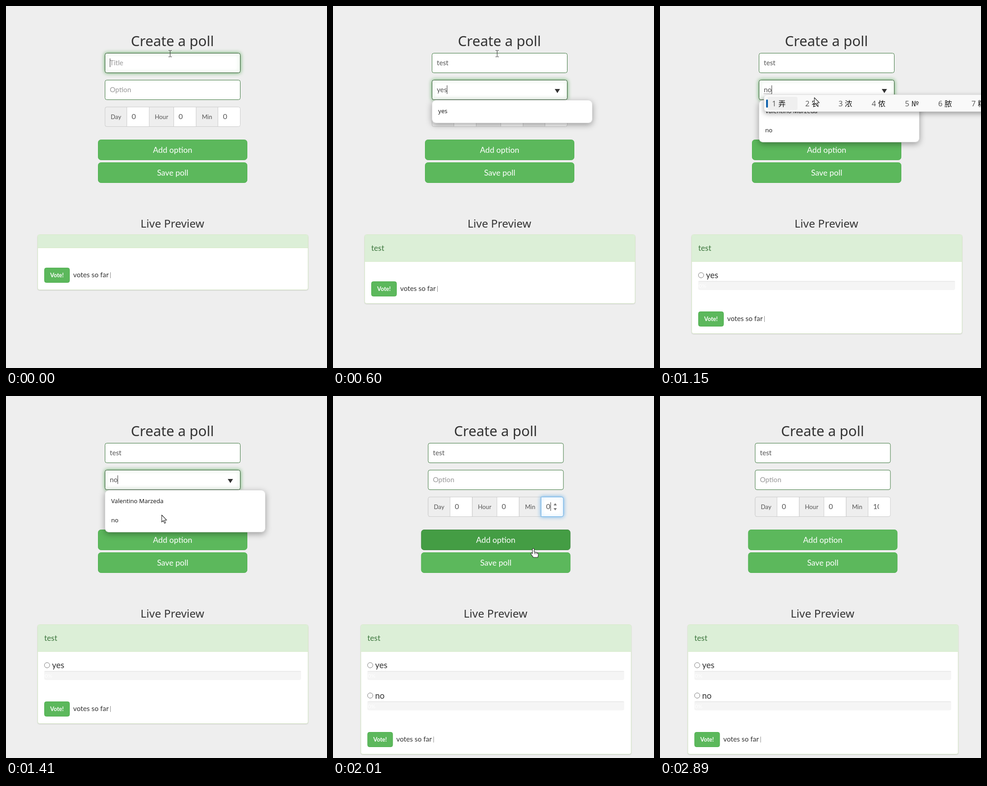
An HTML page with a canvas that plays this animation: 705 by 794 pixels, repeating every 2960 ms.

```html
<!DOCTYPE html>
<html lang="en">
<head>
<meta charset="utf-8">
<title>Create a poll</title>
<style>
html, body { margin: 0; width: 100%; height: 100%; overflow: hidden; background: #eee; }
canvas { display: block; width: 705px; height: 794px; }
</style>
</head>
<body>
<canvas id="stage" width="705" height="794"></canvas>
<script>
const ctx = document.getElementById('stage').getContext('2d');
const LOOP = 2960, STEPS = 44;
const BODY = 'Lato, "Noto Sans", sans-serif';
const HEAD = '"Noto Sans", "Open Sans", sans-serif';
const UI = '"Open Sans", "Noto Sans", sans-serif';
const CJK = '"Noto Sans CJK SC", "Noto Sans CJK", "Noto Sans", sans-serif';

// Pointer path: step, x, y
const PATH = [
  [0, 360, 104], [9, 360, 104], [13, 278, 307], [14, 278, 307],
  [16, 339, 201], [19, 339, 201], [23, 345, 321], [26, 345, 321],
  [28, 470, 243], [30, 440, 335], [34, 440, 335], [36, 430, 362], [40, 430, 362]
];
const HAND = new Path2D('M-2 1.5a2 2 0 0 1 4 0V7l6 1.5q3.5 1 3 5l-1.2 5.5H0l-5-7q-1-2 .5-2.6t2.5 1.6z');
const ARROW = new Path2D('M0 0V15.5l3.6-3.3 2.6 6 2.4-1.1-2.5-5.8H11z');

const within = (k, a, b) => k >= a && k <= b;

function text(str, x, y, size, color, font = BODY, align = 'left', weight = 400) {
  ctx.font = `${weight} ${size}px ${font}`;
  ctx.fillStyle = color;
  ctx.textAlign = align;
  ctx.fillText(str, x, y);
  return ctx.measureText(str).width;
}

function box(x, y, w, h, r, fill, stroke, line = 1) {
  ctx.beginPath();
  ctx.roundRect(x, y, w, h, r);
  if (fill) { ctx.fillStyle = fill; ctx.fill(); }
  if (stroke) { ctx.strokeStyle = stroke; ctx.lineWidth = line; ctx.stroke(); }
}

function shadowed(color, blur, dy, draw) {
  ctx.save();
  ctx.shadowColor = color;
  ctx.shadowBlur = blur;
  ctx.shadowOffsetY = dy;
  draw();
  ctx.restore();
}

function vline(x, y, h, color) {
  ctx.fillStyle = color;
  ctx.fillRect(x, y, 1, h);
}

function field(y, value, hint, focused, composing) {
  const paint = () => box(217.5, y + .5, 297, 43, 4, '#fff', focused ? '#2b542c' : '#3c763d');
  if (focused) shadowed('#67b168', 9, 0, paint);
  else paint();
  const w = text(value || hint, 228, y + 27, 15.2, value ? '#555' : '#999');
  if (composing) {
    ctx.fillStyle = '#555';
    for (let i = 0; i < w; i += 2) ctx.fillRect(228 + i, y + 30, 1, 1);
  }
  if (focused) vline(value ? Math.round(228 + w) : 228, y + 12, 19, '#333');
}

function duration(k) {
  const cells = [['Day', 217, 265, 314], ['Hour', 314, 368, 417], ['Min', 417, 465, 514]];
  box(217.5, 221.5, 297, 43, 4, '#fff', '#ccc');
  for (const [label, x, mid, end] of cells) {
    box(x + .5, 221.5, mid - x, 43, x === 217 ? [4, 0, 0, 4] : 0, '#eee', '#ccc');
    text(label, (x + mid) / 2 + .5, 248, 13.2, '#555', BODY, 'center');
    if (label !== 'Min') text('0', mid + 11, 248, 16, '#555');
    if (end < 514) vline(end, 222, 43, '#bbb');
  }
  const focused = within(k, 28, 38);
  if (focused) {
    shadowed('#66afe9', 9, 0, () => box(465.5, 221.5, 49, 43, [0, 4, 4, 0], '#fff', '#66afe9'));
    ctx.fillStyle = '#777';
    for (const s of [-1, 1]) {
      ctx.beginPath();
      ctx.moveTo(493, 243 + s * 3);
      ctx.lineTo(500, 243 + s * 3);
      ctx.lineTo(496.5, 243 + s * 8);
      ctx.fill();
    }
  }
  const value = k < 32 ? '0' : k < 34 ? '1' : '10';
  ctx.save();
  ctx.beginPath();
  ctx.rect(466, 222, 23.5, 42);
  ctx.clip();
  const w = text(value, 476.5, 248, 16, '#555');
  ctx.restore();
  if (focused) vline(Math.min(488, Math.round(477 + w)), 233, 19, '#333');
}

function button(label, y, state) {
  const [fill, edge] = {
    idle: ['#5cb85c', '#4cae4c'],
    hover: ['#449d44', '#398439'],
    down: ['#398439', '#255625']
  }[state];
  if (state === 'down') {
    box(202.5, y + .5, 327, 44, 6, '#fff', edge);
    box(205, y + 3, 322, 39, 4, fill, '#111', 2);
  } else {
    box(202.5, y + .5, 327, 44, 6, fill, edge);
  }
  text(label, 366, y + 29, 17.6, '#fff', BODY, 'center');
}

function preview(title, options) {
  const head = title ? 60 : 30;
  const vote = 501 + head + 43 + Math.round(66.4 * options.length);
  const bottom = vote + 49;
  shadowed('rgba(0,0,0,.1)', 2, 1, () => box(69.5, 501.5, 594, bottom - 502, 4, '#fff', '#d6e9c6'));
  box(70, 502, 593, head - 1, [3, 3, 0, 0], '#dcefd7');
  ctx.fillStyle = '#d6e9c6';
  ctx.fillRect(70, 500 + head, 593, 1);
  text(title, 84, 537, 17, '#3c763d');
  options.forEach((name, i) => {
    const y = 590 + i * 66.5;
    ctx.beginPath();
    ctx.arc(90.2, y + .5, 5.8, 0, 7);
    ctx.fillStyle = '#fff';
    ctx.fill();
    ctx.strokeStyle = '#767676';
    ctx.lineWidth = 1;
    ctx.stroke();
    text(name, 101, y + 7, 18.4, '#333');
    box(84, y + 13, 564, 20, 4, '#f5f5f5');
    box(84, y + 13, 564, 2, [4, 4, 0, 0], '#ebebeb');
    text('0%', 85, y + 28, 12, '#fff');
  });
  box(84.5, vote + .5, 55, 32, 4, '#5cb85c', '#4cae4c');
  text('Vote!', 112, vote + 21, 12.6, '#fff', BODY, 'center', 700);
  text('votes so far', 147.5, vote + 21, 15.3, '#333');
  vline(229, vote + 10, 13, '#888');
}

function suggestions(items, fade) {
  const h = 9 + 42 * items.length;
  ctx.save();
  if (fade) {
    ctx.globalAlpha = .25;
    ctx.translate(393, 231);
    ctx.scale(.96, .96);
    ctx.translate(-393, -231);
  }
  shadowed('rgba(0,0,0,.35)', fade ? 4 : 14, fade ? 1 : 4,
    () => box(217, 206, 353, h, 9, fade ? '#f4f4f4' : '#fff'));
  box(217.5, 206.5, 352, h - 1, 9, null, 'rgba(0,0,0,.15)');
  items.forEach((s, i) => text(s, 231, 235 + 42 * i, 13.2, '#111', UI));
  ctx.restore();
}

function victoryHand(x, y) {
  ctx.strokeStyle = '#e5ad3c';
  ctx.lineCap = 'round';
  ctx.lineWidth = 3.4;
  ctx.beginPath();
  ctx.moveTo(x + 4, y - 5);
  ctx.lineTo(x + 6, y + 3);
  ctx.moveTo(x + 11, y - 5);
  ctx.lineTo(x + 9, y + 3);
  ctx.stroke();
  ctx.lineCap = 'butt';
  box(x + 2, y, 11, 8, 4, '#e5ad3c');
}

function imeBar(words) {
  shadowed('rgba(0,0,0,.35)', 12, 4, () => box(228, 194, 500, 38, 7, '#f9f9f9'));
  box(228.5, 194.5, 500, 37, 7, null, 'rgba(0,0,0,.1)');
  box(236, 199, 66, 29, 4, '#efefef');
  box(233, 205, 4, 18, 2, '#0f62ad');
  let x = 246;
  words.forEach((word, i) => {
    text(i + 1, x, 220, 16.5, '#555', UI);
    if (word === 'hand') victoryHand(x + 17, 214);
    else text(word, x + 14, 220, 16, '#111', CJK);
    x += word.length > 4 ? 104 : 73;
  });
}

function pointerAt(k) {
  const i = Math.max(1, PATH.findIndex(p => p[0] >= k));
  const [a, ax, ay] = PATH[i - 1], [b, bx, by] = PATH[i];
  const u = (k - a) / (b - a), e = u * u * (3 - 2 * u);
  return [ax + (bx - ax) * e, ay + (by - ay) * e];
}

function pointer(x, y, beam) {
  ctx.save();
  ctx.translate(Math.round(x), Math.round(y));
  if (beam) {
    ctx.fillStyle = '#333';
    ctx.fillRect(0, -6, 1, 13);
    for (const dy of [-7, 7]) {
      ctx.fillRect(-3, dy, 3, 1);
      ctx.fillRect(1, dy, 3, 1);
    }
  } else {
    const hand = y > 293, shape = hand ? HAND : ARROW;
    ctx.fillStyle = '#fff';
    ctx.strokeStyle = '#222';
    ctx.lineWidth = 1.1;
    ctx.lineJoin = 'round';
    ctx.fill(shape);
    ctx.stroke(shape);
    if (hand) for (const dx of [2, 5, 8]) vline(dx, 8, 4, '#333');
  }
  ctx.restore();
}

function optionText(k) {
  if (k < 4) return '';
  if (k < 6) return 'ye';
  if (k < 14) return 'yes';
  if (k < 16) return '';
  if (k < 17) return 'n';
  return k < 26 ? 'no' : '';
}

function draw(k) {
  ctx.fillStyle = '#eee';
  ctx.fillRect(0, 0, 705, 794);

  const shown = k < 41;
  const [px, py] = shown ? pointerAt(k) : [-50, -50];
  const over = y => within(py, y, y + 44) ? 'hover' : 'idle';
  const addDown = within(k, 13, 14) || within(k, 24, 27);
  const saveDown = within(k, 38, 40);
  const title = ['', 'te'][k] ?? 'test';
  const options = k < 14 ? [] : k < 26 ? ['yes'] : ['yes', 'no'];

  ctx.save();
  if (k >= 26) ctx.translate(-8.5, 0);
  text('Create a poll', 365.5, 88, 31, '#333', HEAD, 'center');
  field(103, title, 'Title', k < 3);
  field(162, optionText(k), 'Option', within(k, 3, 12) || within(k, 15, 23),
    within(k, 4, 5) || within(k, 16, 18));
  duration(k);
  button('Add option', 293, addDown ? 'down' : over(293));
  button('Save poll', 343, saveDown ? 'down' : over(343));
  text('Live Preview', 365.5, 486, 24.3, '#333', HEAD, 'center');
  preview(title, options);
  ctx.restore();

  const first = within(k, 4, 13), second = within(k, 16, 24);
  if (first || second) {
    const fade = k === 13 || k === 24;
    if (!fade) {
      ctx.fillStyle = '#333';
      ctx.beginPath();
      ctx.moveTo(487, 182);
      ctx.lineTo(498.5, 182);
      ctx.lineTo(492.8, 191);
      ctx.fill();
    }
    suggestions(first ? ['yes'] : ['Valentino Marzeda', 'no'], fade);
  }
  if (within(k, 4, 8)) imeBar(['也', '页', '叶', 'hand', '( •`ω •´)y', '耶']);
  if (within(k, 17, 19)) imeBar(['弄', '农', '浓', '侬', '№', '脓', '糯']);

  if (k === 13 || k === 24 || k === 38) {
    ctx.fillStyle = 'rgba(170,200,18,.85)';
    ctx.beginPath();
    ctx.arc(px, py - 1, 13.2, 0, 7);
    ctx.fill();
  }
  if (shown) pointer(px, py, py < 150 || k === 28);
}

const start = performance.now();
function tick(now) {
  const t = Math.max(0, now - start) % LOOP;
  draw(Math.min(STEPS - 1, Math.floor((t + 14) / (LOOP / STEPS))));
  requestAnimationFrame(tick);
}
draw(0);
requestAnimationFrame(tick);
</script>
</body>
</html>
```
